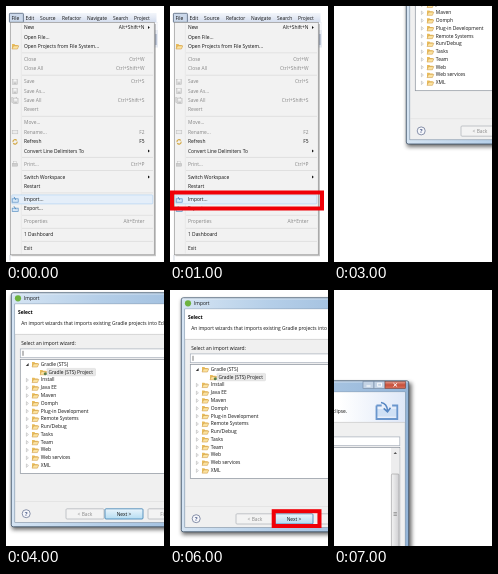
These frames come from a looping animation (158x256 px, 8 s). An HTML page:

```html
<!DOCTYPE html>
<html lang="en">
<head>
<meta charset="utf-8">
<title>Import wizard</title>
<style>
html, body { margin: 0; width: 100%; height: 100%; overflow: hidden; background: #fff; }
svg { display: block; width: 100vw; height: 100vh; }
text { font-family: "Open Sans", "Noto Sans", sans-serif; white-space: pre; }
</style>
</head>
<body>
<svg id="stage" viewBox="0 0 158 256" xmlns="http://www.w3.org/2000/svg">
  <defs>
    <linearGradient id="bar" x2="0" y2="1"><stop stop-color="#f3f6fb"/><stop offset="1" stop-color="#d3dced"/></linearGradient>
    <linearGradient id="glass" x2="1" y2="0"><stop stop-color="#d5e4f3"/><stop offset=".4" stop-color="#b4cee8"/><stop offset="1" stop-color="#94b5d8"/></linearGradient>
    <linearGradient id="banner" x2="1" y2="0"><stop offset=".7" stop-color="#fff"/><stop offset="1" stop-color="#dfe8f8"/></linearGradient>
    <linearGradient id="button" x2="0" y2="1"><stop stop-color="#f5f5f5"/><stop offset="1" stop-color="#dadada"/></linearGradient>
    <linearGradient id="blue" x2="0" y2="1"><stop stop-color="#eaf5fc"/><stop offset="1" stop-color="#b5dcf2"/></linearGradient>
    <linearGradient id="close" x2="0" y2="1"><stop stop-color="#e3a093"/><stop offset=".5" stop-color="#c7503b"/><stop offset="1" stop-color="#d9705a"/></linearGradient>
    <linearGradient id="thumb" x2="1" y2="0"><stop stop-color="#f4f4f4"/><stop offset="1" stop-color="#cfcfd2"/></linearGradient>
    <filter id="blur" x="-10%" y="-10%" width="120%" height="120%"><feGaussianBlur stdDeviation="2"/></filter>
  </defs>
  <g id="menu"></g>
  <g id="dialog"></g>
</svg>
<script>
const NS = 'http://www.w3.org/2000/svg';
const menu = document.getElementById('menu');
const dialog = document.getElementById('dialog');
let layer = menu;

function add(tag, attrs) {
  const el = document.createElementNS(NS, tag);
  for (const key in attrs) el.setAttribute(key, attrs[key]);
  layer.append(el);
  return el;
}
const rect = (x, y, width, height, fill, more) => add('rect', { x, y, width, height, fill, ...more });
const path = (d, fill, more) => add('path', { d, fill, ...more });
const line = (d, stroke, w = 0.6) => path(d, 'none', { stroke, 'stroke-width': w });
const edge = (stroke, w = 0.6, rx = 0) => ({ stroke, 'stroke-width': w, rx });

// y is the middle of the lower-case letters
function label(x, y, str, fill = '#111', more = {}, size = 4.9) {
  const el = add('text', { x, y: y + size * 0.33, fill, 'font-size': size, ...more });
  el.textContent = str;
}

function redBox(x, y, w, h) {
  return rect(x + 2, y + 2, w - 4, h - 4, 'none', edge('#f00008', 4));
}

function folder(x, y) {
  path(`M${x} ${y - 2.2}h2.4l.8 .9h2.6v1.3h-4.2l-1.6 2.6z`, '#e9bd5c');
  path(`M${x} ${y + 2.7}l1.6 -3.2h5.2l-1.4 3.2z`, '#fbe3a0', edge('#c98f35', 0.5));
}

function tray(x, y, s, color) {
  line(`M${x} ${y}h${s}m${s * 2} 0h${s}v${s * 2.6}h${-s * 4}v${-s * 2.6}`, color, s * 0.35);
}

function disk(x, y) {
  rect(x - 2.5, y - 2.5, 5, 5, '#dedede', edge('#b9b9b9', 0.5));
  rect(x - 1.4, y - 2.3, 2.8, 1.8, '#f6f6f6');
  rect(x - 1.3, y + 0.8, 2.6, 1.6, '#c4c4c4');
}

function smallTray(x, y) {
  rect(x - 2.8, y - 0.6, 6, 3.4, '#d5e6f6', edge('#5d93c5', 0.7));
  line(`M${x - 1} ${y - 2.5}l1.8 3`, '#3f7fb8', 0.8);
}

const icons = {
  folder: (x, y) => folder(x - 3, y),
  disk,
  disks(x, y) { disk(x - 0.7, y - 0.7); disk(x + 0.6, y + 0.6); },
  pen(x, y) { rect(x - 2.8, y - 1.6, 5.6, 3.2, '#ececec', edge('#bbb', 0.5)); },
  refresh(x, y) { line(`M${x - 2} ${y + .6}a2.1 2.1 0 0 1 3.8 -1.6m.3 1a2.1 2.1 0 0 1 -3.8 1.6`, '#d2a640', 1.1); },
  print(x, y) { rect(x - 1.6, y - 2.5, 3.2, 2.4, '#f5f5f5', edge('#bbb', 0.4)); rect(x - 2.7, y - 0.4, 5.4, 2.6, '#cfcfcf', edge('#b0b0b0', 0.4)); },
  tray: smallTray
};

// text, shortcut, flags: d = disabled, s = submenu, h = hovered, | = line below, then icon
const items = [
  ['New', 'Alt+Shift+N', 's'], ['Open File...', '', ''],
  ['Open Projects from File System...', '', '|', 'folder'],
  ['Close', 'Ctrl+W', 'd'], ['Close All', 'Ctrl+Shift+W', 'd|'],
  ['Save', 'Ctrl+S', 'd', 'disk'], ['Save As...', '', 'd', 'disk'],
  ['Save All', 'Ctrl+Shift+S', 'd', 'disks'], ['Revert', '', 'd|'],
  ['Move...', '', 'd'], ['Rename...', 'F2', 'd', 'pen'],
  ['Refresh', 'F5', '', 'refresh'], ['Convert Line Delimiters To', '', 's|'],
  ['Print...', 'Ctrl+P', 'd|', 'print'],
  ['Switch Workspace', '', 's'], ['Restart', '', '|'],
  ['Import...', '', 'h', 'tray'], ['Export...', '', '|', 'tray'],
  ['Properties', 'Alt+Enter', 'd|'], ['1 Dashboard', '', '|'], ['Exit', '', '']
];

function drawMenu() {
  layer = menu;
  rect(3, 7, 147.5, 9.5, 'url(#bar)');
  rect(148, 16.5, 4, 25, '#e6eaf2');
  rect(148, 17, 4, 7, '#f6f7fa');
  line('M150 28v11', '#aab5ca', 1.4);
  line('M4 249v5.5', '#a9b4c4');
  rect(3.4, 7.3, 14, 9, '#cbd8ea', edge('#46566e', 0.7, 0.8));
  [[5.5, 'File'], [19.5, 'Edit'], [34, 'Source'], [56, 'Refactor'], [81, 'Navigate'], [107, 'Search'], [128, 'Project']]
    .forEach(([x, s]) => label(x, 12, s));
  rect(5.5, 18, 144.5, 232.2, '#000', { opacity: 0.22 });
  rect(4.3, 16.4, 144, 232.4, '#f2f2f2', edge('#949494', 0.7));
  line('M15.3 17.5v230', '#dedede', 0.5);
  let y = 21.6;
  for (const [name, keys, flags, icon] of items) {
    const color = flags.includes('d') ? '#858585' : '#111';
    if (flags.includes('h')) rect(5.8, y - 4.5, 141, 9, '#e4eef9', edge('#a9cdee', 0.6, 0.8));
    if (icon) icons[icon](9, y);
    label(18, y, name, color);
    label(138.5, y, keys, color, { 'text-anchor': 'end' });
    if (flags.includes('s')) path(`M142 ${y - 1.5}l1.8 1.5l-1.8 1.5z`, '#111');
    y += 9.35;
    if (flags.includes('|')) {
      line(`M16 ${y - 2.8}h131`, '#d6d6d6', 0.6);
      y += 3.7;
    }
  }
  return redBox(0, 184.5, 154, 20);
}

const tree = ['Gradle (STS)', 'Gradle (STS) Project', 'Install', 'Java EE', 'Maven', 'Oomph', 'Plug-in Development',
  'Remote Systems', 'Run/Debug', 'Tasks', 'Team', 'Web', 'Web services', 'XML'];

function pushButton(x, str, fill, border, color) {
  rect(x, 218.8, 38, 10.2, fill, edge(border, 0.8, 1));
  label(x + 19, 224, str, color, { 'text-anchor': 'middle' });
}

function drawDialog() {
  layer = dialog;
  rect(6, 5, 227.5, 234.6, '#000', { opacity: 0.6, filter: 'url(#blur)' });
  rect(5.3, 2.8, 225.4, 234, 'url(#glass)', edge('#3d5168', 0.8, 2));
  rect(6.2, 3.6, 223.6, 0.7, '#fff', { opacity: 0.7 });
  add('circle', { cx: 12, cy: 8.3, r: 3.1, fill: '#6db33f' });
  label(18, 8.3, 'Import');

  // window buttons
  rect(185, 3.3, 11, 7.2, '#c3d3e5', edge('#71869f', 0.6));
  rect(196, 3.3, 11, 7.2, '#c3d3e5', edge('#71869f', 0.6));
  rect(207, 3.3, 20.5, 7.2, 'url(#close)', edge('#73403a', 0.6));
  line('M188.5 8h4', '#fff', 1.2);
  rect(199.7, 5.2, 3.8, 3, 'none', edge('#fff', 0.9));
  line('M215.5 5.2l3.6 3.4m0 -3.4l-3.6 3.4', '#fff', 1);

  rect(8.8, 14, 218.4, 218.6, '#f0f0f0', edge('#7d8fa3', 0.6));
  rect(9.1, 14.3, 217.8, 30, 'url(#banner)');
  line('M9 44.4h218', '#c2c2c2');
  label(12, 22, 'Select', '#000', { 'font-weight': 700 });
  label(15.2, 33.7, 'An import wizards that imports existing Gradle projects into Eclipse.');
  rect(199, 31, 20, 7.5, '#cfe0f5');
  tray(198.5, 27.5, 5.2, '#6a96cd');
  line('M203 24.5q6 1 6.5 8m-3.8 -2.2l3.8 3.6l3 -4.2', '#5585c2', 1.6);

  label(15.2, 53.2, 'Select an import wizard:');
  rect(14.3, 58.9, 207.5, 8.8, '#fff', edge('#a5adb8', 0.7));
  line('M17 60.8v5', '#222', 0.6);
  rect(14.3, 69.5, 207.5, 114, '#fff', edge('#8b929c', 0.7));

  // scroll bar
  rect(213, 70, 8.5, 113, '#ededee');
  path('M215.6 76l1.7 -2l1.7 2z', '#555');
  path('M215.6 178l1.7 2l1.7 -2z', '#555');
  rect(213.4, 96, 7.6, 79, 'url(#thumb)', edge('#9a9a9d', 0.6, 1));
  line('M215.5 134.5h3.4m-3.4 1.5h3.4m-3.4 1.5h3.4', '#777', 0.6);

  tree.forEach((name, i) => {
    const y = 74.3 + i * 7.78;
    if (i === 1) {
      rect(41, y - 3.7, 48.5, 7.4, '#e8e8e8', edge('#d5d5d5', 0.5, 0.8));
      folder(34, y);
      add('circle', { cx: 39.3, cy: y + 1.6, r: 1.5, fill: '#5b7f4a' });
    } else {
      if (i) path(`M20.4 ${y - 1.5}l2 1.7l-2 1.7z`, '#fff', edge('#a2a2a2', 0.5));
      else path(`M22.6 ${y - 1.2}v2.8h-2.8z`, '#333');
      folder(26, y);
    }
    label(i === 1 ? 42.4 : 34.8, y, name);
  });

  line('M9 211.5h218', '#dcdcdc');
  add('circle', { cx: 20.2, cy: 223.7, r: 4, fill: '#f6f7fb', stroke: '#6c7896', 'stroke-width': 0.8 });
  label(20.2, 223.8, '?', '#4c5c88', { 'text-anchor': 'middle', 'font-weight': 700 }, 6);
  pushButton(60, '< Back', '#f3f3f3', '#b4b8bd', '#8a8a8a');
  pushButton(99, 'Next >', 'url(#blue)', '#3c7fb1', '#111');
  pushButton(142, 'Finish', '#f3f3f3', '#b4b8bd', '#8a8a8a');
  pushButton(184, 'Cancel', 'url(#button)', '#8a8a8a', '#111');
  return redBox(95.7, 214.2, 49.8, 18.8);
}

const menuBox = drawMenu();
const dialogBox = drawDialog();

// one shot per second: layer, x, y, red box shown
const shots = [
  [menu, 0, 0, 0], [menu, 0, 0, 1], [menu, -43.5, 62.2, 1],
  [dialog, 67, -98.8, 0], [dialog, 0, 0, 0], [dialog, 0, 0, 1],
  [dialog, 6, 5, 1], [dialog, -156, 88, 0]
];

function render(ms) {
  const [shown, x, y, boxed] = shots[Math.floor(ms / 1000) % shots.length];
  for (const g of [menu, dialog]) g.setAttribute('display', g === shown ? 'inline' : 'none');
  shown.setAttribute('transform', `translate(${x} ${y})`);
  for (const box of [menuBox, dialogBox]) box.setAttribute('display', boxed ? 'inline' : 'none');
}

const start = performance.now();
function tick() {
  render(Math.max(0, performance.now() - start));
  requestAnimationFrame(tick);
}
tick();
</script>
</body>
</html>
```
